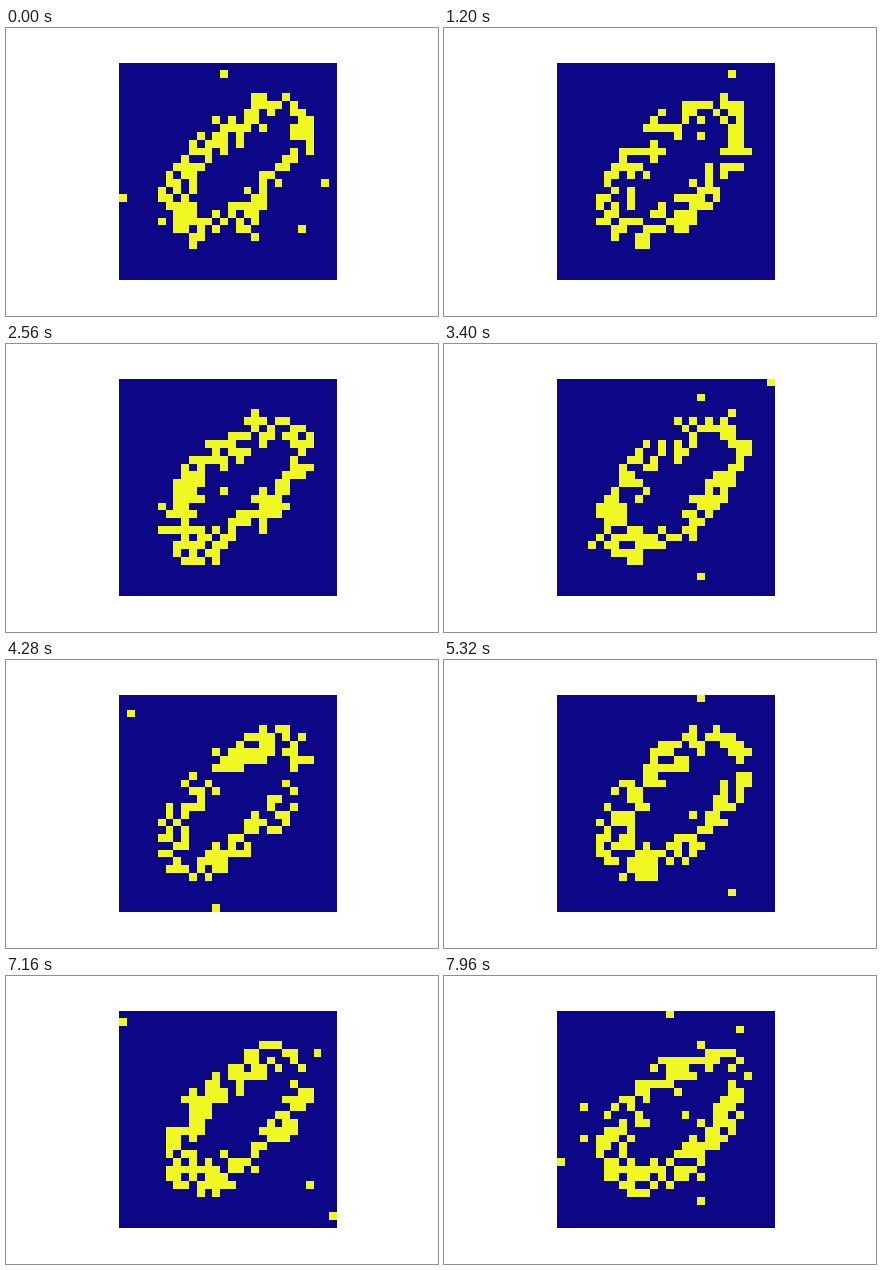
Recreate the animation shown at these times as a matplotlib script. Size 432 px wide and 288 px high, loop 8 s.

```python
import numpy as np
import matplotlib.pyplot as plt
from matplotlib.animation import FuncAnimation

N, FRAMES, STEP_MS = 28, 200, 40
PEAK = 0.62      # firing probability in the middle of the stroke
NOISE = 0.008    # background firing probability


def ellipse(cx, cy, rx, ry, tilt):
    """Cells inside an ellipse of half extents rx, ry leaning to the right."""
    y, x = np.mgrid[:N, :N]
    u, v = (x - cx) / rx, (y - cy) / ry
    return u * u + 2 * tilt * u * v + v * v <= 1 - tilt * tilt


def firing_rate(ring):
    """Strongest inside the stroke, weaker along its edges."""
    pad = np.pad(ring.astype(float), 1)
    near = sum(pad[i:i + N, j:j + N] for i in range(3) for j in range(3)) / 9
    return np.where(ring, PEAK * near, NOISE)


outer = ellipse(14.5, 13.5, 10, 10, 0.5)
hole = ellipse(15.4, 13, 6.3, 5.6, 0.83)
RATE = firing_rate(outer & ~hole)


def spikes(frame):
    rng = np.random.default_rng(1000 + frame)
    return (rng.random((N, N)) < RATE).astype(float)


fig, ax = plt.subplots(figsize=(6, 4), dpi=72, facecolor="white")
fig.subplots_adjust(left=0.125, right=0.9, bottom=0.125, top=0.88)
ax.axis("off")
image = ax.imshow(spikes(0), cmap="plasma", vmin=0, vmax=1,
                  interpolation="nearest")


def update(frame):
    image.set_data(spikes(frame))
    return [image]


anim = FuncAnimation(fig, update, frames=FRAMES, interval=STEP_MS,
                     repeat=True, repeat_delay=0, blit=False)
plt.show()
```
